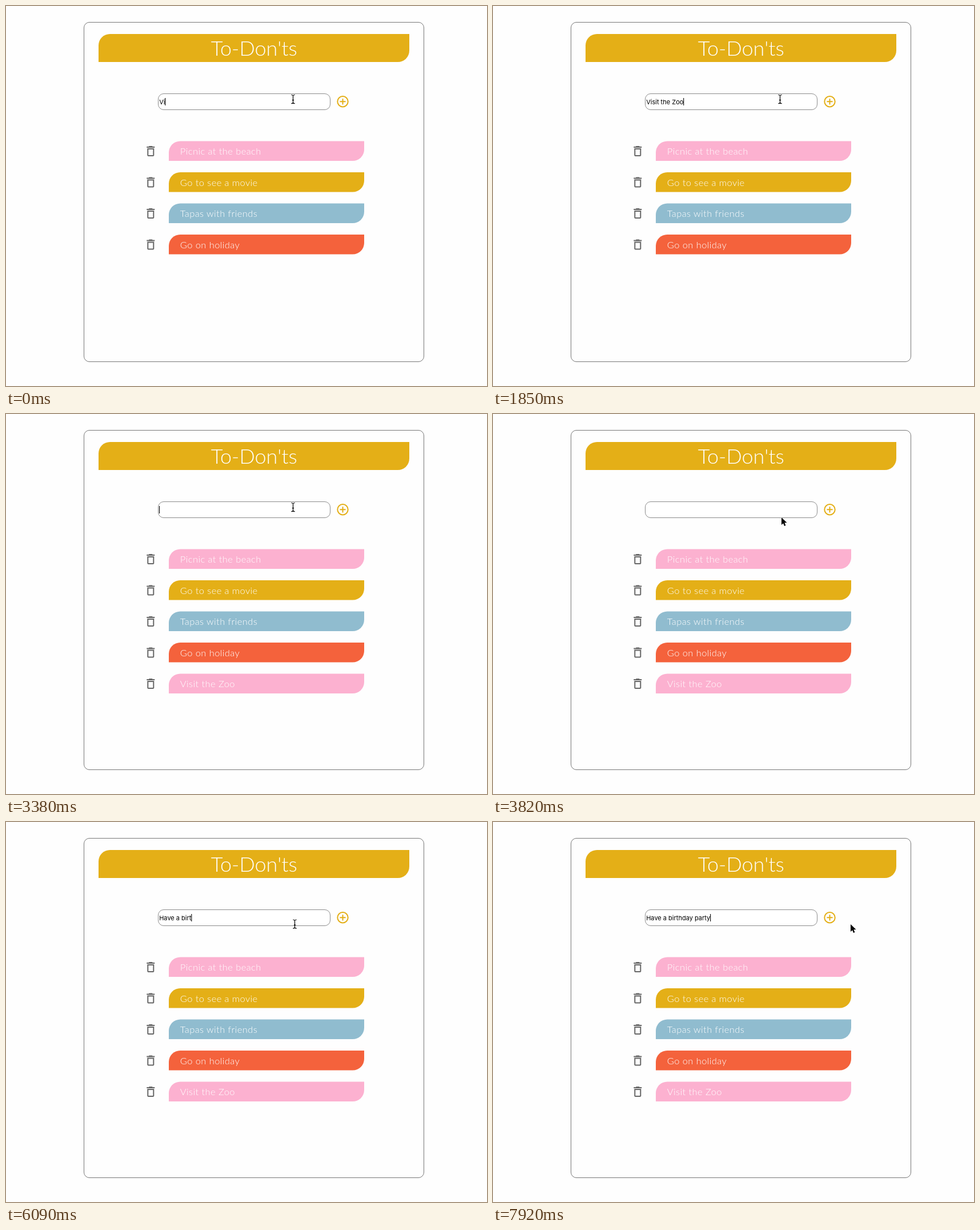
Animation, 842 px wide and 665 px high, one loop 8 s. Source, as an HTML page:

```html
<!DOCTYPE html>
<html lang="en">
<head>
<meta charset="utf-8">
<title>To-Don'ts</title>
<style>
  html, body { margin: 0; width: 100%; height: 100%; overflow: hidden; background: #fefefe; }
  svg { display: block; }
  .title, .label { font-family: Lato, sans-serif; font-weight: 300; fill: #fff; }
  .title { font-size: 36px; text-anchor: middle; }
  .label { font-size: 16.5px; letter-spacing: .4px; }
  #typed { font: 11px Inter, sans-serif; fill: #000; white-space: pre; }
</style>
</head>
<body>
<svg width="842" height="665" viewBox="0 0 842 665">
  <defs>
    <path id="bin" fill="#666" d="M16 9v10H8V9h8m-1.5-6h-5l-1 1H5v2h14V4h-3.5l-1-1zM18 7H6v12c0 1.1.9 2 2 2h8c1.1 0 2-.9 2-2V7z"/>
    <path id="leaf" d="M0 34.5V20A20 20 0 0 1 20 0H342V14.5A20 20 0 0 1 322 34.5Z"/>
  </defs>
  <rect x="136.5" y="28.5" width="595" height="594" rx="9.5" fill="#fefefe" stroke="#777"/>
  <path d="M162 98V69A20 20 0 0 1 182 49H706V78A20 20 0 0 1 686 98Z" fill="#e4af17"/>
  <text class="title" x="434.3" y="87">To-Don'ts</text>
  <rect x="266.5" y="153.5" width="301" height="28" rx="9.5" fill="#fff" stroke="#8c8c8c"/>
  <g fill="none" stroke="#e4af17" stroke-width="2">
    <circle cx="589.5" cy="167.3" r="9.2"/>
    <path d="M589.5 162.2v10.2M584.4 167.3h10.2"/>
  </g>
  <g id="list"></g>
  <text id="typed" x="268.2" y="172"></text>
  <rect id="caret" y="161" width="1.1" height="13"/>
  <g id="beam" fill="none">
    <path d="M-3.2-7.5Q-.6-7.5 0-6Q.6-7.5 3.2-7.5M0-6V6.2M-3.2 7.7Q-.6 7.7 0 6.2Q.6 7.7 3.2 7.7M-1.6 1.6H1.6" stroke="#000" stroke-width="1.2"/>
  </g>
  <path id="arrow" d="M0 0V13L3 10.2L5 14.9L7.4 13.9L5.4 9.3H9.5Z" fill="#000" stroke="#fff" stroke-width="1" paint-order="stroke"/>
</svg>
<script>
const LOOP = 8000;
const $ = id => document.getElementById(id);
const [typed, caret, beam, arrow] = ['typed', 'caret', 'beam', 'arrow'].map($);

const items = [
  ['Picnic at the beach', '#fcb1d0'],
  ['Go to see a movie', '#e4af17'],
  ['Tapas with friends', '#90bccf'],
  ['Go on holiday', '#f4623c'],
  ['Visit the Zoo', '#fcb1d0']
];
$('list').innerHTML = items.map(([label, color], i) => `
  <g transform="translate(0 ${236.5 + i * 54.5})">
    <use href="#bin" transform="translate(241.3 5.6)"/>
    <use href="#leaf" x="285" fill="${color}"/>
    <text class="label" x="304.8" y="23.6">${label}</text>
  </g>`).join('');
const added = $('list').lastElementChild;

// [time, text]
const first = 'Visit the Zoo', second = 'Have a birthday party';
const typing = (text, from, times) => times.map((t, i) => [t, text.slice(0, from + i)]);
const texts = [
  ...typing(first, 2, [0, 120, 230, 330, 540, 710, 800, 890, 980, 1460, 1730, 1850]),
  [2330, ''],
  ...typing(second, 1, [4720, 4960, 5040, 5110, 5200, 5370, 5550, 5650, 5750, 5850, 6030, 6120]),
  ...typing(second, 14, [6210, 6300, 6450, 6510, 6570, 6630, 6810, 6870])
];
const blinks = [[0, 1], [2810, 0], [3380, 1], [3820, 0], [4300, 1], [7350, 0], [7850, 1]];

// [time, shape, x, y]; the arrow is placed by its tip
const moves = [
  [0, beam, 502.5, 163],
  [3470, beam, 503, 170],
  [3560, arrow, 505, 186],
  [3650, arrow, 505.5, 190],
  [3740, arrow, 505, 186],
  [3820, arrow, 505, 181],
  [3880, arrow, 505, 179],
  [3940, beam, 505.5, 178.5],
  [7500, beam, 515, 179],
  [7570, arrow, 549, 187],
  [7640, arrow, 596, 190],
  [7710, arrow, 632, 188],
  [7780, arrow, 643, 184],
  [7850, arrow, 637, 181],
  [7920, arrow, 626, 179]
];

const at = (steps, t) => steps.findLast(s => s[0] <= t);

function draw() {
  const t = performance.now() % LOOP;
  const text = at(texts, t)[1].replaceAll(' ', '\u00a0');
  if (typed.textContent !== text) typed.textContent = text;
  caret.setAttribute('x', 268 + (text ? typed.getComputedTextLength() : 0));
  caret.style.opacity = at(blinks, t)[1];
  added.style.display = t < 2330 ? 'none' : '';

  const [, shape, x, y] = at(moves, t);
  for (const s of [beam, arrow]) s.style.display = s === shape ? '' : 'none';
  shape.setAttribute('transform', `translate(${x} ${y})`);
  requestAnimationFrame(draw);
}
draw();
</script>
</body>
</html>
```
